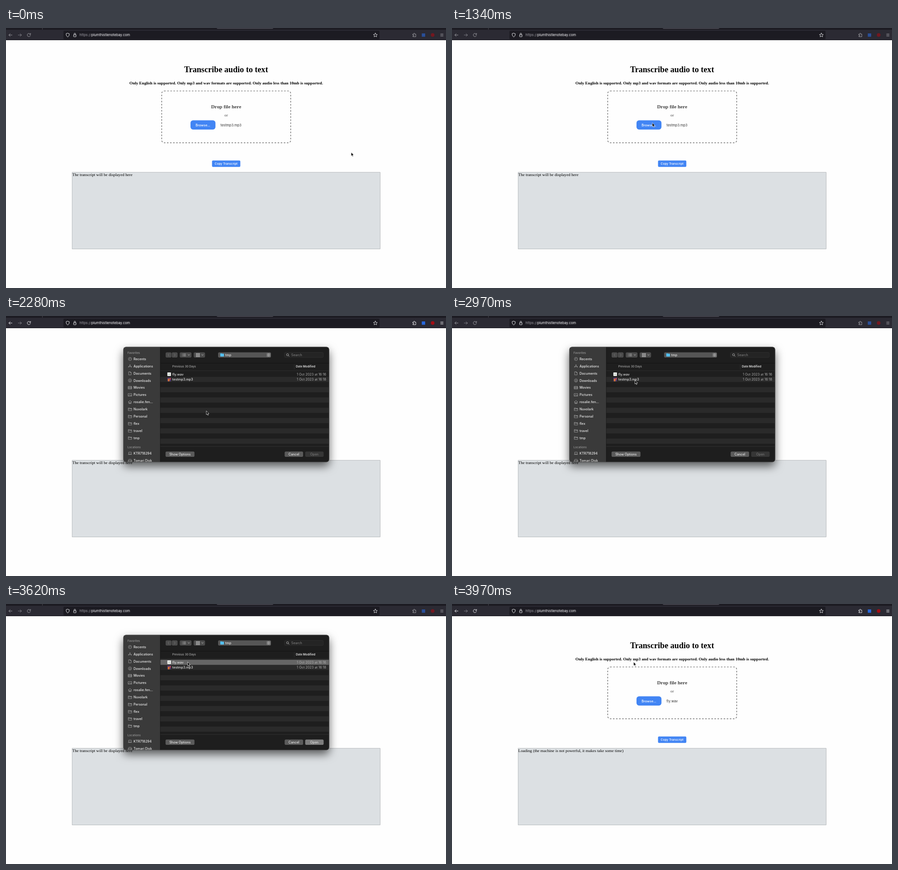
Write an HTML page that moves like this. It is 973 by 576 pixels and loops after 8 s.

```html
<!DOCTYPE html>
<html lang="en">
<head>
<meta charset="utf-8">
<title>Audio transcription</title>
<style>
  html, body { margin: 0; width: 100%; height: 100%; overflow: hidden; background: #fefefe; }
  svg { display: block; width: 973px; height: 576px; }
  .ui { font-family: Inter, Roboto, sans-serif; }
  .serif { font-family: "Liberation Serif", "Times New Roman", serif; }
  .line { fill: none; stroke-linecap: round; stroke-linejoin: round; }
</style>
</head>
<body>
<svg id="stage" viewBox="0 0 973 576" xmlns="http://www.w3.org/2000/svg"></svg>
<script>
const LOOP = 8000;

const esc = s => s.replace(/&/g, "&amp;").replace(/</g, "&lt;");
const rect = (x, y, w, h, fill, rx = 0, extra = "") =>
  `<rect x="${x}" y="${y}" width="${w}" height="${h}" fill="${fill}" rx="${rx}" ${extra}/>`;
const line = (d, color, width = 0.9, extra = "") =>
  `<path class="line" d="${d}" stroke="${color}" stroke-width="${width}" ${extra}/>`;
const text = (family, x, y, size, fill, str, extra = "") =>
  `<text class="${family}" x="${x}" y="${y}" font-size="${size}" fill="${fill}" ${extra}>${esc(str)}</text>`;
const ui = (...args) => text("ui", ...args);
const serif = (...args) => text("serif", ...args);
const MIDDLE = 'text-anchor="middle"';
const BOLD = 'font-weight="700"';
const MEDIUM = 'font-weight="500"';

function toolbar() {
  const ink = "#fbfbfe";
  return rect(0, 0, 973, 27, "#2b2a33")
    + rect(0, 0, 973, 4, "#1c1b22")
    + rect(80, 0, 0.8, 3.5, "#55545c")
    + rect(466, -3, 125, 4.8, "#4a4953", 2)
    + rect(0, 26.3, 973, 0.7, "#111015")
    + rect(127, 6, 699, 19.2, "#1c1b22", 2.5)
    + line("M34 15.6H27M31 12.5L34.2 15.6L31 18.7", ink, 0.9, 'opacity=".45"')
    + `<g id="chrome">`
    + line("M6.2 15.6H13.4M9.4 12.5L6.2 15.6L9.4 18.7", ink)
    + line("M53.4 13.2A3.6 3.6 0 1 0 54.2 16.2M54.4 11.8V14.2H52", ink)
    + line("M899.8 13.5H901.6V12.6A1.1 1.1 0 0 1 903.8 12.6V13.5H906.2V19.3H899.8V17.6H901A1 1 0 0 0 901 15.4H899.8Z", ink)
    + rect(919.5, 12, 7.4, 7.4, "#2868dc")
    + `<circle cx="943.5" cy="15.6" r="4" fill="#a30d14"/>`
    + line("M961 13.1H966.8M961 15.6H966.8M961 18.1H966.8", ink, 0.8)
    + `</g>`
    + line("M136.5 11.5L140 12.8C140.2 16 139 18.5 136.5 19.8C134 18.5 132.8 16 133 12.8Z", ink)
    + rect(149.4, 15, 5.6, 4.4, "none", 0.8, `stroke="${ink}" stroke-width=".9"`)
    + line("M150.5 15V13.2A1.7 1.7 0 0 1 153.9 13.2V15", ink)
    + line("M816.8 11.2L818.1 14.1L821.2 14.4L818.9 16.5L819.6 19.6L816.8 18L814 19.6L814.7 16.5L812.4 14.4L815.5 14.1Z", ink, 0.8)
    + ui(162.6, 18.4, 7.5, "#a3a2a9", "https://")
    + ui(188.6, 18.4, 7.6, ink, "plumthistlenotebay.com");
}

function page() {
  return serif(486.7, 98.4, 18.15, "#000", "Transcribe audio to text", `${MIDDLE} ${BOLD}`)
    + serif(487, 124.8, 9.1, "#000",
      "Only English is supported. Only mp3 and wav formats are supported. Only audio less than 10mb is supported.", `${MIDDLE} ${BOLD}`)
    + rect(344.4, 139.5, 285.2, 114.8, "#fff", 5.5, 'id="drop" stroke-width="1.2" stroke-dasharray="3.4 3.4"')
    + serif(486.8, 178.4, 11.3, "#444", "Drop file here", `id="dropTitle" ${MIDDLE} ${BOLD}`)
    + serif(486.9, 195.7, 9.1, "#444", "or", MIDDLE)
    + rect(408, 204.6, 55.2, 20.3, "#4285f4", 5.7, 'id="browse"')
    + ui(435.5, 217.5, 7.3, "#fff", "Browse...", `${MIDDLE} ${MEDIUM}`)
    + ui(474.3, 217.5, 7.45, "#333", "", 'id="fileName"')
    + rect(455.6, 293.6, 62.6, 14.2, "#4285f4", 2.2)
    + ui(486.8, 303.2, 6.6, "#fff", "Copy Transcript", `${MIDDLE} ${MEDIUM}`)
    + rect(146.2, 319.7, 681.2, 169.8, "#dce0e3", 0, 'stroke="#a0a4a8" stroke-width=".7"')
    + serif(146.6, 327.7, 9.1, "#000", "", 'id="transcript"');
}

// Sidebar icons, centred on 0,0
const ICONS = {
  clock: "M3.6 0A3.6 3.6 0 1 1 -3.6 0A3.6 3.6 0 1 1 3.6 0M0 -2V0.3H-1.6",
  apps: "M-3.4 2.8L0.6 -3.2M3.4 2.8L-0.6 -3.2M-3.6 1H3.6",
  doc: "M-2.6 -3.5H0.6L2.7 -1.4V3.5H-2.6ZM0.6 -3.5V-1.4H2.7",
  down: "M3.6 0A3.6 3.6 0 1 1 -3.6 0A3.6 3.6 0 1 1 3.6 0M0 -1.9V1.8M-1.4 0.5L0 1.9L1.4 0.5",
  film: "M-3.8 -2.8H3.8V2.8H-3.8ZM-2 -2.8V2.8M2 -2.8V2.8M-2 0H2M-3.8 0H-2M2 0H3.8",
  image: "M-3.8 -2.8H3.8V2.8H-3.8ZM-3.6 2L-1 -0.3L0.8 1.2L1.9 0.4L3.7 2",
  home: "M-3.8 0L0 -3.5L3.8 0M-2.7 -0.8V3.3H2.7V-0.8M-0.8 3.3V1H0.8V3.3",
  folder: "M-3.8 2.8V-2.7H-1L-0.2 -1.9H3.8V2.8ZM-3.8 -0.6H3.8",
  laptop: "M-2.9 1.4V-2.6H2.9V1.4ZM-4 2.6H4",
  drive: "M-3.8 0.4L-2.4 -2.6H2.4L3.8 0.4V2.8H-3.8ZM-3.8 0.4H3.8M2 1.6H2.4"
};

function sidebar() {
  const item = (icon, label, y) =>
    `<g transform="translate(274.2 ${y})">${line(ICONS[icon], "#b4b4b4", 0.7)}</g>`
    + ui(282, y + 2.6, 7.25, "#ececec", label, MEDIUM);
  const heading = (label, y) => ui(268.8, y + 2.2, 6.25, "#969696", label, MEDIUM);
  const favorites = [
    ["clock", "Recents"], ["apps", "Applications"], ["doc", "Documents"], ["down", "Downloads"],
    ["film", "Movies"], ["image", "Pictures"], ["home", "rosalie.fen..."], ["folder", "Nuvolark"],
    ["folder", "Personal"], ["folder", "flex"], ["folder", "travel"], ["folder", "tmp"]
  ];
  return rect(259.5, 68.5, 81.5, 255, "#3a3a3a")
    + heading("Favorites", 82)
    + favorites.map(([icon, label], i) => item(icon, label, 95.2 + i * 15.9)).join("")
    + heading("Locations", 291)
    + item("laptop", "KTR718294", 304.2)
    + item("drive", "Tomari Disk", 320.1);
}

function fileRows() {
  const top = 123.4, height = 11.4;
  let out = "";
  for (let i = 1; i < 14; i += 2) out += rect(341.5, top + i * height, 373, height, "#2a2a2a");
  out += rect(341.5, top, 373, height, "#666", 0, 'id="selection"');
  const row = (name, date, y) =>
    ui(367.8, y + 2.6, 7.22, "#e4e4e4", name, MEDIUM) + ui(708, y + 2.6, 7.3, "#b0b0b0", date, 'text-anchor="end"');
  return out
    + rect(356.8, 125, 8, 8, "#eceeec", 0.8) + rect(359, 127.2, 3.6, 3.6, "#c9d3c9")
    + rect(356.8, 136.6, 8, 8, "#5b3b74") + rect(358, 139, 3.6, 5.6, "#d9772f") + rect(361.8, 137.4, 2.6, 3.5, "#c2414d")
    + row("fly.wav", "1 Oct 2023 at 16:16", 129.1)
    + row("testmp3.mp3", "1 Oct 2023 at 16:18", 140.5);
}

function dialog() {
  const button = (x, w, label, fill, ink, id = "") =>
    rect(x, 300.2, w, 11.8, fill, 2.8, id && `id="${id}"`)
    + ui(x + w / 2, 308.5, 7.1, ink, label, `${MIDDLE} ${MEDIUM} ${id && `id="${id}Label"`}`);
  const control = (x, w) => rect(x, 80.5, w, 11.6, "#4b4b4b", 2.8);
  const chevron = (x, y) => line(`M${x - 1.7} ${y - 0.8}L${x} ${y + 0.9}L${x + 1.7} ${y - 0.8}`, "#d0d0d0");
  const grid = [0, 3, 6].map(x => [0, 3, 6].map(y => rect(420.2 + x, 82.6 + y, 2.2, 2.2, "#bdbdbd")).join("")).join("");
  return rect(259.5, 68.5, 455, 255, "#1e1e1e", 6, 'filter="url(#shadow)"')
    + `<g clip-path="url(#panel)">`
    + rect(341, 68.5, 374, 255, "#1e1e1e")
    + sidebar()
    + rect(340.8, 68.5, 0.7, 255, "#101010")
    + rect(341.5, 104, 373, 0.7, "#101010")
    + rect(341.5, 120.8, 373, 0.7, "#363636")
    + rect(637, 107, 0.6, 11, "#3d3d3d")
    + rect(341.5, 288.6, 373, 0.7, "#3a3a3a")
    + fileRows()
    + `</g>`
    + control(353, 12.8) + control(366.6, 12.8) + control(384.2, 26) + control(415, 25.2)
    + line("M360.4 83.9L358.4 86.3L360.4 88.7M372.2 83.9L374.2 86.3L372.2 88.7", "#7e7e7e", 0.8)
    + line("M392 84H397.4M392 86.3H397.4M392 88.6H397.4M389.6 84H390M389.6 86.3H390M389.6 88.6H390", "#c4c4c4", 0.8)
    + grid + chevron(404.3, 86.3) + chevron(434.5, 86.3)
    + rect(469, 80.6, 117, 11.4, "#565656", 2.8)
    + rect(473.8, 82.8, 4, 2.5, "#38a8dc", 0.6) + rect(473.8, 83.6, 8.2, 6.2, "#55c1f0", 0.8)
    + ui(484.8, 88.9, 7.2, "#ececec", "tmp", MEDIUM)
    + rect(576.2, 82, 8.8, 8.8, "#777", 2)
    + line("M579 85.5L580.6 83.9L582.2 85.5M579 87.3L580.6 88.9L582.2 87.3", "#f0f0f0", 0.8)
    + rect(615.6, 80.7, 86.2, 11.2, "#242424", 2.8, 'stroke="#363636" stroke-width=".6"')
    + `<circle cx="622.6" cy="85.8" r="2.3" fill="none" stroke="#c8c8c8" stroke-width=".8"/>`
    + line("M624.4 87.6L626.2 89.4", "#c8c8c8")
    + ui(630.8, 88.9, 7.2, "#888", "Search")
    + ui(367.8, 114.4, 6.25, "#a8a8a8", "Previous 30 Days", MEDIUM)
    + ui(641, 114.4, 6.35, "#e4e4e4", "Date Modified", 'font-weight="600"')
    + button(352.8, 64, "Show Options", "#5b5b5b", "#ececec")
    + button(616.2, 40.8, "Cancel", "#5b5b5b", "#ececec")
    + button(661.6, 40.8, "Open", "#363636", "#757575", "open")
    + rect(259.8, 68.8, 454.4, 254.4, "none", 6, 'stroke="#666" stroke-opacity=".6" stroke-width=".6"');
}

const cursors = `
  <path id="arrow" d="M0 0V8.4L1.9 6.7L3.2 9.7L4.6 9.1L3.3 6.2H5.9Z" fill="#000" stroke="#fff" stroke-width=".7" stroke-linejoin="round"/>
  <path id="hand" transform="translate(442 210.2)" d="M1.6 1.2C1.6 .2 3 .2 3 1.2V4L4.4 3.7L5.6 4L6.7 4.4C7.3 4.7 7.3 5.4 7.2 6.4L6.4 8.2V9.8H2.9L2.6 8.6L.7 6.2C.3 5.4 1.1 4.9 1.7 5.7Z" fill="#fff" stroke="#111" stroke-width=".7" stroke-linejoin="round"/>`;

const stage = document.getElementById("stage");
stage.innerHTML = `<defs>
  <filter id="shadow" x="-20%" y="-20%" width="140%" height="150%"><feDropShadow dx="0" dy="9" stdDeviation="10" flood-color="#000" flood-opacity=".62"/></filter>
  <clipPath id="panel"><rect x="259.5" y="68.5" width="455" height="255" rx="6"/></clipPath>
  </defs>${rect(0, 0, 973, 576, "#fefefe")}${page()}${toolbar()}<g id="dialog">${dialog()}</g>${cursors}`;

const el = {};
for (const node of stage.querySelectorAll("[id]")) el[node.id] = node;

const clamp = v => Math.max(0, Math.min(1, v));
const smooth = p => p * p * (3 - 2 * p);
const cubicInOut = p => p < 0.5 ? 4 * p ** 3 : 1 - 4 * (1 - p) ** 3;
const quadOut = p => 1 - (1 - p) ** 2;

// Pointer strokes: quadratic curves shown in a set number of discrete steps
const moves = [
  { start: 470, end: 640, steps: 4, ease: smooth, path: [[763.3, 275.4], [680, 231], [596.8, 212.3]] },
  { start: 880, end: 1340, steps: 9, ease: cubicInOut, path: [[596.8, 212.3], [520, 189.5], [443, 210.2]] },
  { start: 2520, end: 3320, steps: 14, ease: quadOut, path: [[443, 210.2], [405.6, 164], [402, 128.8]] },
  { start: 3380, end: 3381, steps: 1, ease: smooth, path: [[402, 128.8], [401.8, 128.6], [401.6, 128.4]] }
];

function pointerAt(t) {
  let move = moves[0];
  for (const m of moves) if (t >= m.start) move = m;
  const step = Math.floor((t - move.start) / (move.end - move.start) * (move.steps - 1) + 0.02);
  const p = t < move.start ? 0 : move.ease(clamp((step + 1) / move.steps));
  const [a, b, c] = move.path;
  return [0, 1].map(i => (1 - p) ** 2 * a[i] + 2 * p * (1 - p) * b[i] + p * p * c[i]);
}

const mix = (from, to, p) => `rgb(${from.map((v, i) => Math.round(v + (to[i] - v) * p))})`;
const grey = (from, to, p) => mix([from, from, from], [to, to, to], p);
const show = (node, visible) => node.setAttribute("visibility", visible ? "visible" : "hidden");
const between = (t, start, end) => t >= start && t < end;

function render(t) {
  const hover = t < 3910 ? smooth(clamp((t - 1490) / 220)) : 0;
  const active = between(t, 1510, 2340) || t >= 3910;
  const picked = t >= 3620;
  const loaded = t >= 3970;
  const pointing = between(t, 1510, 2280);

  el.chrome.setAttribute("opacity", active ? 1 : 0.6);
  el.drop.setAttribute("fill", grey(254, 237, hover));
  el.drop.setAttribute("stroke", grey(85, 17, hover));
  el.dropTitle.setAttribute("fill", grey(68, 34, hover));
  el.browse.setAttribute("fill", mix([66, 133, 244], [53, 105, 197], hover));
  el.fileName.textContent = loaded ? "fly.wav" : "testmp3.mp3";
  el.transcript.textContent = loaded
    ? "Loading (the machine is not powerful, it makes take some time)"
    : "The transcript will be displayed here";

  show(el.dialog, between(t, 2280, 3910));
  el.selection.setAttribute("opacity", picked ? 1 : 0);
  el.open.setAttribute("fill", picked ? "#7d7d7d" : "#363636");
  el.openLabel.setAttribute("fill", picked ? "#dedede" : "#757575");

  show(el.arrow, !pointing);
  show(el.hand, pointing);
  el.arrow.setAttribute("transform", `translate(${pointerAt(t).join(" ")})`);
}

const origin = performance.now();
function tick() {
  render((performance.now() - origin) % LOOP);
  requestAnimationFrame(tick);
}
tick();
</script>
</body>
</html>
```
